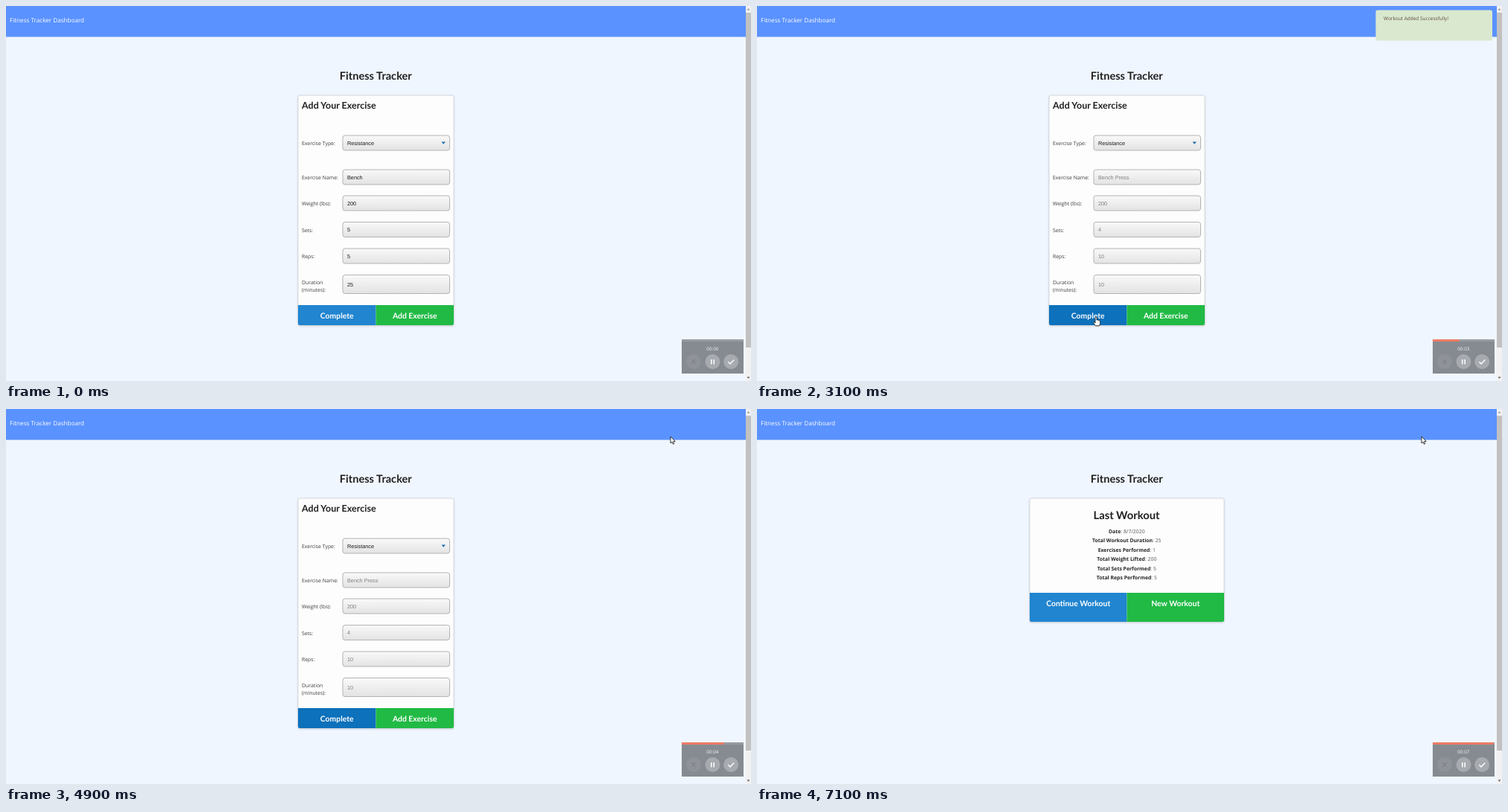
Recreate the animation shown at these times as an HTML page with a canvas. Size 1000x504 px, loop 7.2 s.

```html
<!DOCTYPE html>
<html lang="en">
<head>
<meta charset="utf-8">
<title>Fitness Tracker</title>
<style>
html, body { margin: 0; width: 100%; height: 100%; overflow: hidden; background: #f0f6ff; }
canvas { display: block; width: 1000px; height: 504px; }
</style>
</head>
<body>
<canvas id="stage" width="1000" height="504"></canvas>
<script>
const ctx = document.getElementById('stage').getContext('2d');
const LOOP = 7200;
const CLICK = 2550, NAVIGATE = 5300, STATUS_END = 6500;
const SANS = '"Open Sans", "Noto Sans", sans-serif';
const LATO = 'Lato, sans-serif';
const ARIAL = '"Liberation Sans", Arial, sans-serif';
const BLUE = '#2185d0', GREEN = '#21ba45';

// label, label y, box top, box height, value, placeholder
const FIELDS = [
  ['Exercise Name:', 230.5, 220, 20, 'Bench', 'Bench Press'],
  ['Weight (lbs):', 266, 255, 20, '200', '200'],
  ['Sets:', 301.3, 290.5, 20, '5', '4'],
  ['Reps:', 336.8, 326, 20, '5', '10'],
  ['Duration', 372, 361.5, 25, '25', '10']
];
const STATS = [
  ['Date', '8/7/2020'], ['Total Workout Duration', '25'], ['Exercises Performed', '1'],
  ['Total Weight Lifted', '200'], ['Total Sets Performed', '5'], ['Total Reps Performed', '5']
];
// pointer path: time, x, y
const PATH = [
  [300, 915, 460], [700, 770, 425], [1120, 573, 373], [1350, 573, 373], [1700, 490, 407],
  [2050, 455, 418], [3250, 455, 418], [3650, 520, 335], [3900, 613, 249],
  [4020, 685, 190], [4450, 892, 37], [7200, 892, 37]
];

function rect(x, y, w, h, fill) {
  ctx.fillStyle = fill;
  ctx.fillRect(x, y, w, h);
}

function round(x, y, w, h, r, fill, stroke) {
  ctx.beginPath();
  ctx.roundRect(x, y, w, h, r);
  if (fill) { ctx.fillStyle = fill; ctx.fill(); }
  if (stroke) { ctx.strokeStyle = stroke; ctx.lineWidth = 1; ctx.stroke(); }
}

function poly(points, fill, stroke) {
  ctx.beginPath();
  points.forEach(([x, y]) => ctx.lineTo(x, y));
  ctx.closePath();
  if (fill) { ctx.fillStyle = fill; ctx.fill(); }
  if (stroke) { ctx.strokeStyle = stroke; ctx.lineWidth = 0.9; ctx.stroke(); }
}

function line(points, color, width) {
  ctx.beginPath();
  points.forEach(([x, y]) => ctx.lineTo(x, y));
  ctx.strokeStyle = color;
  ctx.lineWidth = width;
  ctx.stroke();
}

// y is the middle of the capital letters
function text(str, x, y, size, family, color, weight = 400, align = 'left') {
  ctx.font = `${weight} ${size}px ${family}`;
  ctx.textRendering = 'geometricPrecision';
  ctx.textAlign = align;
  ctx.fillStyle = color;
  ctx.fillText(str, x, y + size * 0.36);
  return ctx.measureText(str).width;
}

const ramp = (t, a, b) => Math.min(1, Math.max(0, (t - a) / (b - a)));

// smooth curve through the path keys, at rest where two keys coincide
function pointer(t) {
  let i = 0;
  while (i < PATH.length - 2 && PATH[i + 1][0] <= t) i++;
  const a = PATH[i], b = PATH[i + 1], span = b[0] - a[0];
  const u = ramp(t, a[0], b[0]);
  const same = (p, q) => p[1] === q[1] && p[2] === q[2];
  const slope = (k, d) => {
    const p = PATH[k - 1], q = PATH[k], n = PATH[k + 1];
    if (!p || !n || same(p, q) || same(q, n)) return 0;
    return (n[d] - p[d]) / (n[0] - p[0]) * span;
  };
  return [1, 2].map(d =>
    (2 * u ** 3 - 3 * u * u + 1) * a[d] + (u ** 3 - 2 * u * u + u) * slope(i, d) +
    (3 * u * u - 2 * u ** 3) * b[d] + (u ** 3 - u * u) * slope(i + 1, d));
}

const inside = ([px, py], x, y, w, h) => px >= x && px <= x + w && py >= y && py <= y + h;

function card(x, y, w, h) {
  ctx.save();
  ctx.shadowColor = 'rgba(34,36,38,.25)';
  ctx.shadowBlur = 3;
  ctx.shadowOffsetY = 1;
  round(x, y, w, h, 2.5, '#fdfdfd');
  ctx.restore();
  round(x, y, w, h, 2.5, null, '#d5d8de');
}

function buttons(x, y, w, h, textY, left, right, leftColor) {
  const half = w / 2;
  round(x, y, half, h, [0, 0, 0, 2.5], leftColor);
  round(x + half, y, half, h, [0, 0, 2.5, 0], GREEN);
  text(left, x + half / 2, textY, 10.42, LATO, '#fff', 700, 'center');
  text(right, x + half * 1.5, textY, 10.42, LATO, '#fff', 700, 'center');
}

function box(y, h) {
  const g = ctx.createLinearGradient(0, y, 0, y + h);
  g.addColorStop(0, '#f9f9f9');
  g.addColorStop(1, '#e3e3e3');
  round(452, y, 143.5, h, 3, g, '#b3b3b3');
}

function form(t, pos) {
  const sent = t >= CLICK;
  card(392, 120, 209, 309);
  text('Add Your Exercise', 397, 133, 12.5, LATO, '#212121', 700);
  text('Exercise Type:', 397, 184.7, 6.89, SANS, '#3c3c3c');
  box(174, 20);
  text('Resistance', 458, 184, 7.29, ARIAL, '#1c1c1c');
  poly([[584.5, 182.5], [590, 182.5], [587.2, 185.7]], '#1f6fae');

  for (const [label, labelY, y, h, value, hint] of FIELDS) {
    text(label, 397, labelY, 6.89, SANS, '#3c3c3c');
    box(y, h);
    text(sent ? hint : value, 458, y + h / 2, 7.29, ARIAL, sent ? '#808080' : '#1c1c1c');
    if (h > 20 && t >= 300 && inside(pos, 452, y, 143, h)) {
      poly([[583.6, 373], [588, 373], [585.8, 370.6]], '#444');
      poly([[583.6, 375], [588, 375], [585.8, 377.4]], '#444');
    }
  }
  text('(minutes):', 397, 382, 6.89, SANS, '#3c3c3c');

  let color = BLUE;
  if (sent) color = '#0d71bb';
  else if (t > 2350) color = '#1b70b4';
  else if (inside(pos, 392, 402, 104, 27)) color = '#1678c2';
  buttons(392, 402, 209, 27, 416, 'Complete', 'Add Exercise', color);
}

function summary() {
  card(366, 120, 261, 166);
  text('Last Workout', 496, 143, 14.75, LATO, '#212121', 700, 'center');
  STATS.forEach(([name, value], i) => {
    const y = 164.3 + i * 12.45, tail = ': ' + value, size = 6.89;
    ctx.textRendering = 'geometricPrecision';
    ctx.font = `700 ${size}px ${SANS}`;
    const w1 = ctx.measureText(name).width;
    ctx.font = `400 ${size}px ${SANS}`;
    const x = 496.3 - (w1 + ctx.measureText(tail).width) / 2;
    text(name, x, y, size, SANS, '#262626', 700);
    text(tail, x + w1, y, size, SANS, '#555');
  });
  buttons(366, 247, 261, 39, 261, 'Continue Workout', 'New Workout', BLUE);
}

function toast(t) {
  const alpha = ramp(t, 2600, 2900) * (1 - ramp(t, 4250, 4600));
  if (!alpha) return;
  ctx.save();
  ctx.globalAlpha = alpha;
  round(830.5, 5.5, 156.5, 41, 2.5, '#d9e8ce');
  text('Workout Added Successfully!', 841, 17, 6.5, SANS, '#5d4a45');
  ctx.restore();
}

function scrollbar() {
  rect(993, 0, 7, 504, '#f1f1f1');
  rect(993, 9, 7, 450, '#c1c1c1');
  poly([[994.6, 5.5], [998.4, 5.5], [996.5, 3.3]], '#8a8a8a');
  poly([[994.6, 498.5], [998.4, 498.5], [996.5, 500.7]], '#505050');
}

function recorder(t) {
  rect(907, 448, 83, 46, '#868b92');
  rect(907, 448, 83, 3, '#979ba1');
  rect(907, 448, 83 * t / LOOP, 3, '#ee7b66');
  text('00:0' + Math.floor(t / 1000), 948.3, 460.3, 6.3, SANS, '#f4f4f4', 400, 'center');
  [[923, '#8f9399'], [948.5, '#a7aaaf'], [973.2, '#a7aaaf']].forEach(([x, fill]) => {
    ctx.beginPath();
    ctx.arc(x, 478, 10, 0, Math.PI * 2);
    ctx.fillStyle = fill;
    ctx.fill();
  });
  line([[920, 475], [926, 481]], '#777b82', 1);
  line([[926, 475], [920, 481]], '#777b82', 1);
  rect(946, 475, 1.5, 6.5, '#fff');
  rect(949.5, 475, 1.5, 6.5, '#fff');
  line([[969.3, 478.3], [972, 481], [977.3, 475.5]], '#fff', 1.4);
}

function status() {
  round(-1, 493.5, 333.5, 12, [0, 2, 0, 0], '#fbfcfe', '#d9dde3');
  text('Establishing secure connection...', 2.5, 499.2, 5.8, SANS, '#666');
}

function arrow() {
  poly([[0, 0], [0, 9], [2, 7.2], [3.4, 10.3], [4.8, 9.7], [3.5, 6.7], [6.2, 6.5]], '#fff', '#222');
}

function hand() {
  poly([[-1, 0.5], [0, -0.3], [1, 0.5], [1, 4], [2.8, 4], [4.6, 4.7], [5.6, 5.7], [5.6, 8.5],
    [4.6, 11.8], [-0.6, 11.8], [-3.2, 8], [-3.4, 6.8], [-2.4, 6.6], [-1, 8]], '#fff', '#222');
}

function ibeam() {
  line([[-2, -4], [2, -4]], '#333', 1);
  line([[0, -4], [0, 4]], '#333', 1);
  line([[-2, 4], [2, 4]], '#333', 1);
}

function cursor(t, pos) {
  if (t < 300) return;
  const onForm = t < NAVIGATE;
  const typing = onForm && FIELDS.some(f => inside(pos, 452, f[2], 143.5, f[3]));
  const pressing = onForm && inside(pos, 392, 402, 209, 27);
  ctx.save();
  ctx.translate(pos[0], pos[1]);
  (typing ? ibeam : pressing ? hand : arrow)();
  ctx.restore();
}

function draw(t) {
  const pos = pointer(t);
  rect(0, 0, 1000, 504, '#f0f6ff');
  rect(0, 0, 993, 41.5, '#5a92ff');
  text('Fitness Tracker Dashboard', 5, 19, 8.13, SANS, '#fff');
  text('Fitness Tracker', 496.3, 93.3, 14.58, LATO, '#212121', 700, 'center');
  if (t < NAVIGATE) form(t, pos); else summary();
  toast(t);
  scrollbar();
  if (t >= NAVIGATE && t < STATUS_END) status();
  recorder(t);
  cursor(t, pos);
}

const start = performance.now();
function tick() {
  draw((performance.now() - start) % LOOP);
  requestAnimationFrame(tick);
}
tick();
</script>
</body>
</html>
```
